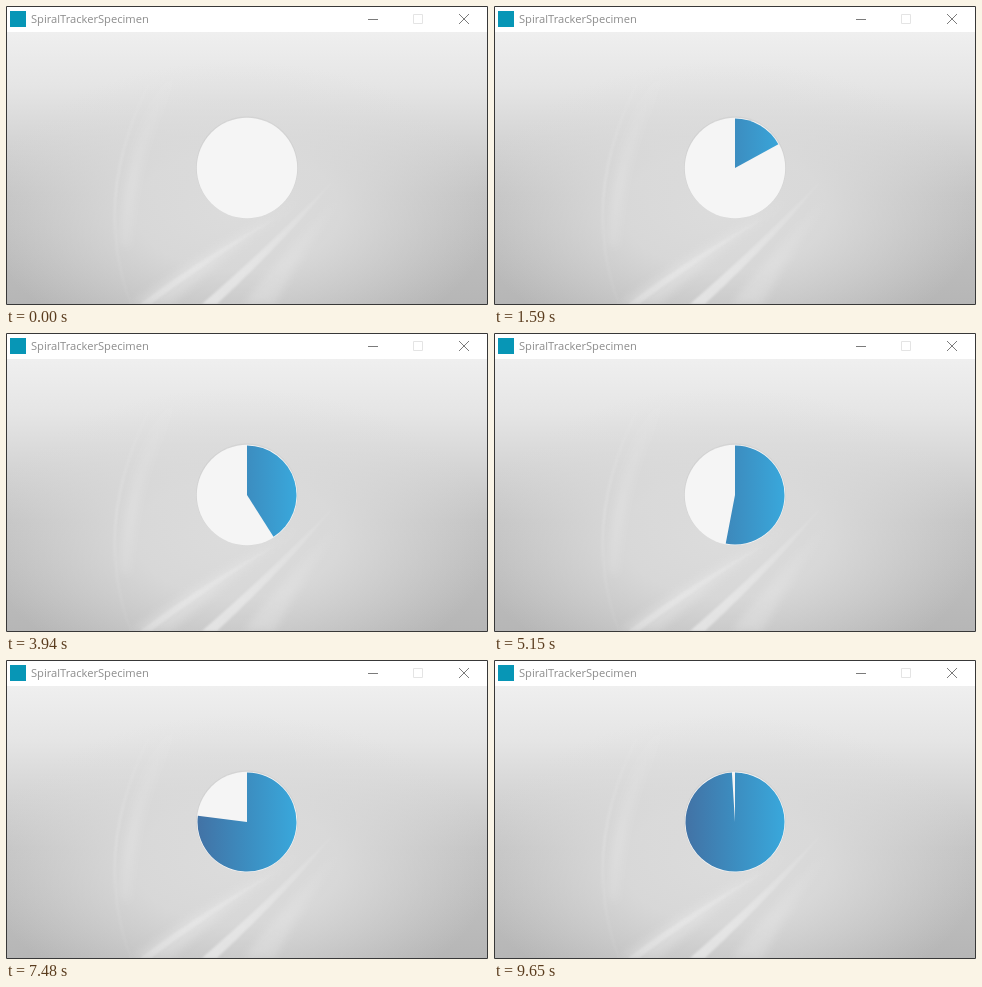
These frames come from a looping animation (482 by 299 pixels, 9750 ms). An HTML page:

```html
<!DOCTYPE html>
<html lang="en">
<head>
<meta charset="utf-8">
<title>Progress</title>
<style>
  html, body { margin: 0; width: 100%; height: 100%; overflow: hidden; background: #fff; }
  svg { display: block; width: 482px; height: 299px; }
  text { font: 11.15px "Open Sans", "Noto Sans", sans-serif; fill: #8c8c8c; }
</style>
</head>
<body>
<svg viewBox="0 0 482 299">
  <defs>
    <linearGradient id="sky" x1="0" y1="26" x2="0" y2="298" gradientUnits="userSpaceOnUse">
      <stop offset="0" stop-color="#efefef"/>
      <stop offset=".2" stop-color="#e5e5e5"/>
      <stop offset=".6" stop-color="#c4c4c4"/>
      <stop offset="1" stop-color="#b6b6b6"/>
    </linearGradient>
    <radialGradient id="glow" gradientUnits="userSpaceOnUse" cx="0" cy="0" r="1"
      gradientTransform="translate(232 205) scale(255 150)">
      <stop offset="0" stop-color="#dcdcdc"/>
      <stop offset=".4" stop-color="#dcdcdc" stop-opacity=".85"/>
      <stop offset="1" stop-color="#dcdcdc" stop-opacity="0"/>
    </radialGradient>
    <linearGradient id="beam" x1="338" y1="162" x2="200" y2="298" gradientUnits="userSpaceOnUse">
      <stop offset="0" stop-color="#fff" stop-opacity="0"/>
      <stop offset="1" stop-color="#fff" stop-opacity=".55"/>
    </linearGradient>
    <linearGradient id="arc" x1="0" y1="60" x2="0" y2="298" gradientUnits="userSpaceOnUse">
      <stop offset="0" stop-color="#fff" stop-opacity="0"/>
      <stop offset=".5" stop-color="#fff" stop-opacity=".2"/>
      <stop offset="1" stop-color="#fff" stop-opacity=".04"/>
    </linearGradient>
    <linearGradient id="blue" x1="191" y1="0" x2="291" y2="0" gradientUnits="userSpaceOnUse">
      <stop offset="0" stop-color="#4272a5"/>
      <stop offset=".5" stop-color="#3c8dc0"/>
      <stop offset="1" stop-color="#39a8dc"/>
    </linearGradient>
    <filter id="soft" x="-20%" y="-20%" width="140%" height="140%"><feGaussianBlur stdDeviation="4"/></filter>
    <filter id="fine" x="-20%" y="-20%" width="140%" height="140%"><feGaussianBlur stdDeviation=".8"/></filter>
  </defs>

  <path d="M0 0H482V299H0Z" fill="#fff"/>
  <path d="M1 26H481V298H1Z" fill="url(#sky)"/>
  <path d="M1 26H481V298H1Z" fill="url(#glow)"/>

  <g fill="none" stroke="url(#arc)">
    <path filter="url(#fine)" stroke-width="2" d="M146 72Q84 190 125 298"/>
    <path filter="url(#soft)" stroke-width="9" d="M170 66Q122 140 119 240"/>
  </g>
  <g fill="url(#beam)">
    <path filter="url(#soft)" opacity=".5" d="M345 180Q290 230 238 298H268Q300 240 345 180Z"/>
    <path filter="url(#soft)" opacity=".4" d="M300 190Q215 235 125 298H165Q230 240 300 190Z"/>
    <path filter="url(#fine)" opacity=".4" d="M272 211Q205 245 134 298H145Q210 250 272 211Z"/>
    <path filter="url(#fine)" opacity=".85" d="M338 162Q280 225 196 298H211Q285 229 338 162Z"/>
  </g>

  <path d="M4 5H20V21H4Z" fill="#0796b6"/>
  <text x="25" y="17">SpiralTrackerSpecimen</text>
  <g fill="none" stroke="#7b7b7b">
    <path d="M362 13.5H372M453 8L463 18M463 8L453 18"/>
    <path d="M407.5 8.5H416.5V17.5H407.5Z" stroke="#e4e4e4"/>
    <path d="M.5 .5H481.5V298.5H.5Z" stroke="#383838"/>
  </g>

  <circle cx="241" cy="161.3" r="51" fill="#000" fill-opacity=".035"/>
  <circle cx="241" cy="162" r="50.2" fill="#f5f5f5"/>
  <path id="pie" fill="url(#blue)"/>
</svg>
<script>
  const LOOP = 9750, STEP = LOOP / 100, LEAD = 68;
  const CX = 241, CY = 162, R = 49.5;
  const pie = document.getElementById("pie");

  // One percent per step; the full circle is never reached.
  const percentAt = t => Math.min(99, Math.floor((t + LEAD) / STEP));

  function sector(percent) {
    if (!percent) return "";
    const a = percent / 50 * Math.PI;
    const x = CX + R * Math.sin(a), y = CY - R * Math.cos(a);
    return `M${CX} ${CY}V${CY - R}A${R} ${R} 0 ${percent > 50 ? 1 : 0} 1 ${x} ${y}Z`;
  }

  const start = performance.now();
  function draw(now) {
    const t = Math.max(0, now - start) % LOOP;
    pie.setAttribute("d", sector(percentAt(t)));
    requestAnimationFrame(draw);
  }
  draw(start);
</script>
</body>
</html>
```
